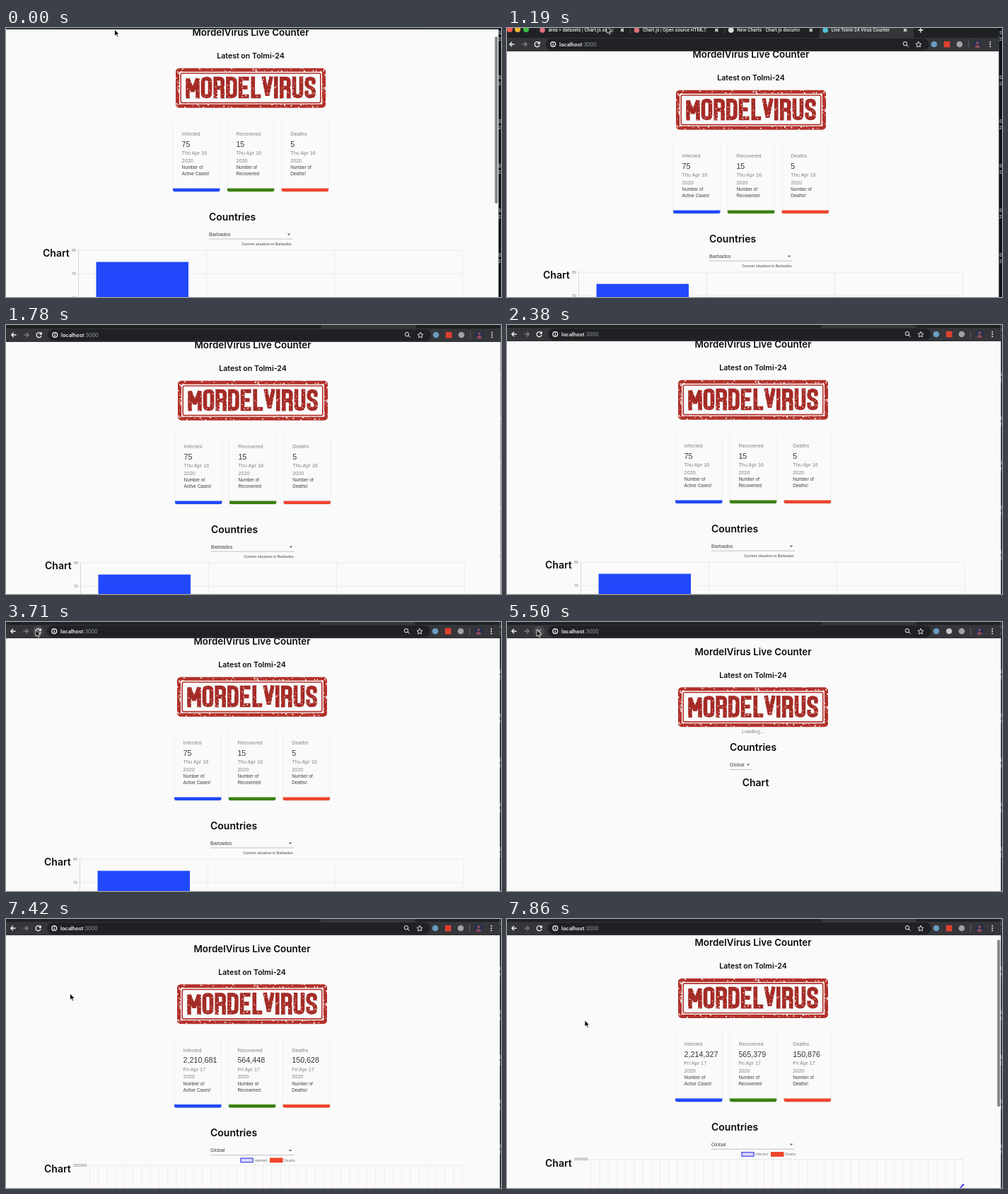
An HTML page that plays this animation: 700x380 px, repeating every 8000 ms.

```html
<!DOCTYPE html>
<html lang="en">
<head>
<meta charset="utf-8">
<title>Live Tolmi-24 Virus Counter</title>
<style>
html, body { margin: 0; width: 100%; height: 100%; overflow: hidden; background: #0d121b; }
svg { display: block; width: 700px; height: 380px; }
text { font-family: "Liberation Sans", Arial, sans-serif; font-size: 7.3px; fill: #858585; }
.head { font: 600 14px Inter, sans-serif; fill: #0c0c0c; }
.title { font-size: 13.4px; }
.sub { font-size: 10.6px; }
.num { font-size: 10.75px; fill: #383838; }
.note { font-size: 6.35px; fill: #404040; }
.pick { font-size: 7.1px; fill: #404040; }
.tiny { font-size: 5px; fill: #777; }
.caption { font-weight: bold; }
.tab { font: 500 6.7px Roboto, sans-serif; fill: #e4e6e9; }
.url { font: 600 7.3px Inter, sans-serif; fill: #f4f4f4; }
.mid { text-anchor: middle; }
.end { text-anchor: end; }
.line { fill: none; stroke: #f1f3f4; stroke-width: 1.3; }
</style>
</head>
<body>
<svg id="stage" viewBox="0 0 700 380"></svg>
<script>
const STEP = 148.3, LOOP = 8000;
const $ = id => document.getElementById(id);
const text = (x, y, cls, s) => `<text x="${x}" y="${y}" class="${cls}">${s}</text>`;
const rect = (x, y, w, h, fill, more = '') =>
  `<rect x="${x}" y="${y}" width="${w}" height="${h}" fill="${fill}" ${more}/>`;
const dot = (x, y, r, fill, more = '') => `<circle cx="${x}" cy="${y}" r="${r}" fill="${fill}" ${more}/>`;
const path = (d, more = 'class="line"') => `<path d="${d}" ${more}/>`;
const group = (id, s) => `<g id="${id}">${s}</g>`;
const range = (n, f) => Array.from({ length: n }, (_, i) => f(i)).join('');

let seed = 7;
const rnd = () => (seed = seed * 16807 % 2147483647) / 2147483647;

// Rubber stamp: condensed block letters as strokes, worn with white flecks
const RED = '#b3302a';
const glyphs = {
  M: 'M0 28V0L7 18L14 0V28',
  O: 'M0 4Q0 0 5 0T10 4V21Q10 25 5 25T0 21Z',
  R: 'M0 28V0H6Q10 0 10 4V9Q10 13 6 13H0M6 13Q10 13 10 17V28',
  D: 'M0 0H5Q10 0 10 5V20Q10 25 5 25H0Z',
  E: 'M12 0H0V25H12M0 12.5H10',
  L: 'M0 -3V25H11',
  V: 'M0 -3L5.5 24L11 -3',
  I: 'M0 -3V28',
  U: 'M0 -3V21Q0 25 5 25T10 21V-3',
  S: 'M10 8V4Q10 0 5 0T0 4V7Q0 10 5 12.5T10 18V21Q10 25 5 25T0 21V17'
};
const advance = { M: 21.5, L: 14.8, I: 8 };

function stamp() {
  let x = 259;
  const word = [...'MORDELVIRUS'].map(c => {
    const s = path(glyphs[c], `transform="translate(${x} 107)"`);
    x += advance[c] || 17.7;
    return s;
  }).join('');
  const fleck = (x, y, r) => dot(x.toFixed(1), y.toFixed(1), r.toFixed(2), '#fafafa');
  return rect(244.5, 94.8, 207, 51, '#fafafa', `rx="2.5" stroke="${RED}" stroke-width="5"`) +
    rect(249.2, 99.5, 197.6, 41.6, 'none', `rx="2" stroke="${RED}" stroke-width="1.6"`) +
    `<g fill="none" stroke="#a52b26" stroke-width="5.6" stroke-miterlimit="2">${word}</g>` +
    range(260, () => fleck(252 + rnd() * 192, 103 + rnd() * 34, .2 + rnd() * .65)) +
    range(110, i => fleck(242 + rnd() * 212, (i % 2 ? 92 : 142) + rnd() * 6, .3 + rnd() * .8)) +
    range(30, i => fleck((i % 2 ? 242 : 449) + rnd() * 5, 94 + rnd() * 52, .3 + rnd() * .8));
}

const cards = [
  ['Infected', 'Active Cases!', '#2149fb', 75, 2214327],
  ['Recovered', 'Recoveries!', '#3a8010', 15, 565379],
  ['Deaths', 'Deaths!', '#ee452f', 5, 150876]
];

const card = ([name, note, color], i) => {
  const x = 238 + i * 76.8, tx = x + 12.6;
  return path(`M${x} 168V263M${x + 66.5} 168V263`, 'stroke="#ececec" stroke-width=".8"') +
    rect(x, 263, 66.5, 4, '#0002', 'rx="2"') +
    path(`M${x} 262H${x + 66.5}V264.5Q${x + 66.5} 266.6 ${x + 64} 266.6H${x + 2.5}Q${x} 266.6 ${x} 264.5Z`, `fill="${color}"`) +
    text(tx, 187.6, '', name) +
    `<text id="num${i}" x="${tx}" y="203.4" class="num"></text>` +
    `<text class="day" x="${tx}" y="214.6"></text>` +
    text(tx, 225.2, '', '2020') +
    text(tx, 234.8, 'note', 'Number of') +
    text(tx, 243.5, 'note', note);
};

const arrow = (x, y) => path(`M${x - 2.3} ${y - 1}h4.6l-2.3 2.4Z`, 'fill="#666"');
const rule = (x1, x2, y) => path(`M${x1} ${y}H${x2}`, 'stroke="#aaa" stroke-width=".7"');
const grid = (d, color) => path(d, `stroke="${color}" stroke-width=".8"`);

const loading =
  text(348, 157, 'mid', 'Loading...') +
  text(348, 182, 'head mid', 'Countries') +
  text(315, 203.8, 'pick', 'Global') + arrow(341, 201.5) + rule(315, 346, 208.5) +
  text(351.5, 232, 'head mid', 'Chart');

const local =
  text(289, 329.4, 'pick', 'Barbados') +
  text(370.5, 342.8, 'tiny caption mid', 'Current situation in Barbados') +
  grid('M99 349.3H647M99 382.8H647M285.5 349V440M466.5 349V440M647.5 349V440', '#e9e9e9') +
  grid('M104.5 349V440', '#d0d0d0') +
  text(100.5, 351.2, 'tiny end', 80) + text(100.5, 384.7, 'tiny end', 70) +
  text(100.5, 418.2, 'tiny end', 60) +
  rect(129.5, 366, 130.5, 80, '#2149fb');

const world =
  text(289, 329.4, 'pick', 'Global') +
  rect(332, 338, 17, 5.6, '#dcd8fa', 'stroke="#4b48ec" stroke-width="1.3"') +
  text(351, 342.8, 'tiny', 'Infected') +
  rect(373, 337.4, 18.5, 6.8, '#f0452c') + text(393, 342.8, 'tiny', 'Deaths') +
  text(114.2, 349.8, 'tiny end', 2500000) +
  grid('M114 348H645', '#e4e4e4') +
  grid(range(44, i => `M${118.5 + i * 12.25} 348V440`), '#efe8ea') +
  path('M645 384L639.5 390L633 400', 'fill="none" stroke="#4b48ec" stroke-width="1.8"') +
  dot(645, 384, 1.6, '#4b48ec') + dot(639.5, 390, 1.6, '#4b48ec');

const page =
  text(348, 46.8, 'head title mid', 'MordelVirus Live Counter') +
  text(348, 78.9, 'head sub mid', 'Latest on Tolmi-24') +
  stamp() + group('loading', loading) +
  group('stats', cards.map(card).join('') +
    text(289, 307, 'head', 'Countries') + arrow(402, 327) + rule(289, 407, 333.5) +
    group('local', local) + group('world', world) + text(54, 358, 'head', 'Chart'));

const tabs = [
  ['area &gt; datasets | Chart.js samp', '#dc7078'],
  ['Chart.js | Open source HTML5', '#dc7078'],
  ['New Charts · Chart.js docume', '#dddddd'],
  ['Live Tolmi-24 Virus Counter', '#4fc3dc']
];
const tab = ([label, color], i) => {
  const x = 53 + i * 133.4;
  return (i < 3 ? '' : path('M440 5Q445 5 445 0V-14Q445 -17 449 -17H574Q578 -17 578 -14V0Q578 5 583 5Z', 'fill="#35363a"')) +
    dot(x, -7, 3.8, color) + text(x + 8.5, -4.8, 'tab', label) +
    (i < 3 ? rect(x + 92, -13, 16, 12, 'url(#fade)') : '') +
    (i < 2 ? rect(x + 124, -12, .8, 10, '#55575b') : '') +
    path(`M${x + 111} -9l4 4m0 -4l-4 4`);
};

const chrome =
  rect(-20, -30, 718.5, 53, '#202124') + tabs.map(tab).join('') +
  path('M588 -10.5v7m-3.5 -3.5h7') +
  dot(7, -8, 4, '#f25b52') + dot(18, -8, 4, '#f0b52e') + dot(30, -8, 4, '#3dbb45') +
  rect(-20, 4, 718.5, 19, '#35363a') +
  path('M13.5 13H7m3 -3.2L6.8 13L10 16.2') +
  path('M24.5 13H31m-3 -3.2L31.2 13L28 16.2', 'class="line" style="stroke:#7d8084"') +
  dot(45.5, 13, 7.5, '#4a4b4f', 'id="hover"') +
  path('M48.6 11.2A3.5 3.5 0 1 0 49 14M49.2 9.2v3h-3', 'id="reload" class="line"') +
  path('M42.8 10.3l5.4 5.4m0 -5.4l-5.4 5.4', 'id="stop" class="line" style="stroke:#a4a6aa"') +
  rect(58, 5, 542, 16.4, '#202124', 'rx="8.2"') +
  path('M71.6 13a3.4 3.4 0 1 1 -6.8 0a3.4 3.4 0 1 1 6.8 0M68.2 12.4v2.6M68.2 10.8v.9') +
  text(77, 15.6, 'url', 'localhost<tspan fill="#9aa0a6" font-weight="400">:3000</tspan>') +
  path('M568.7 12.2a2.7 2.7 0 1 1 -5.4 0a2.7 2.7 0 1 1 5.4 0M568 14l2.8 2.8', 'class="line" style="stroke-width:1"') +
  path('M585 9.2l1.2 2.7 2.8.3 -2.1 1.9.6 2.8 -2.5 -1.4 -2.5 1.4.6 -2.8 -2.1 -1.9 2.8 -.3Z', 'class="line" style="stroke-width:.9"') +
  dot(607, 13, 4.3, '#6a9cc2') +
  rect(620.8, 8.8, 8.6, 8.6, '#e0402e', 'id="ext"') +
  dot(625.2, 13, 4, '#c6c8ca', 'id="extBusy"') +
  dot(643, 13, 4.3, '#a0a2a6') +
  rect(655, 8, .8, 10, '#6a6c70') +
  dot(668.3, 13, 6, '#26304f') + dot(668.3, 11, 2.1, '#8c4a55') +
  path('M664 16.8q4.3 -6 8.6 0q-4.3 3.6 -8.6 0', 'fill="#8c4a55"') +
  range(3, i => dot(686.3, 9.8 + i * 3.2, 1, '#f1f3f4'));

$('stage').innerHTML =
  `<linearGradient id="fade"><stop stop-color="#202124" stop-opacity="0"/><stop offset="1" stop-color="#202124"/></linearGradient>` +
  rect(0, 0, 700, 380, '#0d121b') +
  range(7, i => `<g opacity=".8">${text(696, 9 + i * 62.7, 'tab', 'S')}${text(696, 18 + i * 62.7, 'tab', '20')}</g>`) +
  group('win', rect(-20, 0, 718.5, 440, '#fafafa') + group('page', page) +
    rect(693.3, 24, 4, 236, '#85868a', 'id="thumb" rx="2"') + chrome) +
  path('M0 0V9.3L2.2 7.3L3.7 10.7L5.2 10L3.8 6.8H6.6Z', 'id="cursor" fill="#000" stroke="#fff" stroke-width=".8"');

// Keys hold step, x, y
const drag = [[2, -2, -21], [8, -3, 10], [12, 1, 1], [16, 0, 0]];
const pointerPath = [[45, 42, 11], [52, 110, 143]];

function along(keys, k) {
  if (k <= keys[0][0]) return keys[0].slice(1);
  const i = keys.findIndex(p => p[0] > k);
  if (i < 0) return keys[keys.length - 1].slice(1);
  const [a, b] = [keys[i - 1], keys[i]], u = (k - a[0]) / (b[0] - a[0]);
  return [1, 2].map(j => a[j] + (b[j] - a[j]) * u);
}

const show = (id, on) => $(id).style.display = on ? '' : 'none';
const move = (id, x, y) => $(id).setAttribute('transform', `translate(${x} ${y})`);

function pointer(k, x, y) {
  if (k < 1) return [153.5, 2];
  return k < 23 ? [x + 144, y - 12] : along(pointerPath, k);
}

function draw(now) {
  const k = Math.floor(now % LOOP / STEP);
  const [x, y] = along(drag, k);
  const fresh = k >= 37, busy = k >= 31 && k < 45;
  const scroll = !fresh ? 14.5 : k >= 53 ? 8.4 : 0;
  move('win', x, y);
  move('page', 0, -scroll);
  move('thumb', 0, scroll * .62);
  move('cursor', ...pointer(k, x, y));
  show('thumb', k < 4 || k >= 53);
  show('loading', k === 37);
  show('stats', k !== 37);
  show('local', !fresh);
  show('world', fresh);
  show('hover', k >= 23 && k < 46);
  show('reload', !busy);
  show('stop', busy);
  show('ext', k < 31 || k > 37);
  show('extBusy', k >= 31 && k <= 37);

  // Counters ease out exponentially and settle at step 52
  const p = 1 - Math.max(0, 52 - k) * .0712286446;
  const ease = (1 - 2 ** (-10 * p)) * 1024 / 1023;
  cards.forEach((c, i) =>
    $('num' + i).textContent = fresh ? Math.round(c[4] * ease).toLocaleString('en-US') : c[3]);
  document.querySelectorAll('.day').forEach(d => d.textContent = fresh ? 'Fri Apr 17' : 'Thu Apr 16');
}

let start;
function frame(now) {
  start ??= now;
  draw(now - start);
  requestAnimationFrame(frame);
}
draw(0);
requestAnimationFrame(frame);
</script>
</body>
</html>
```
